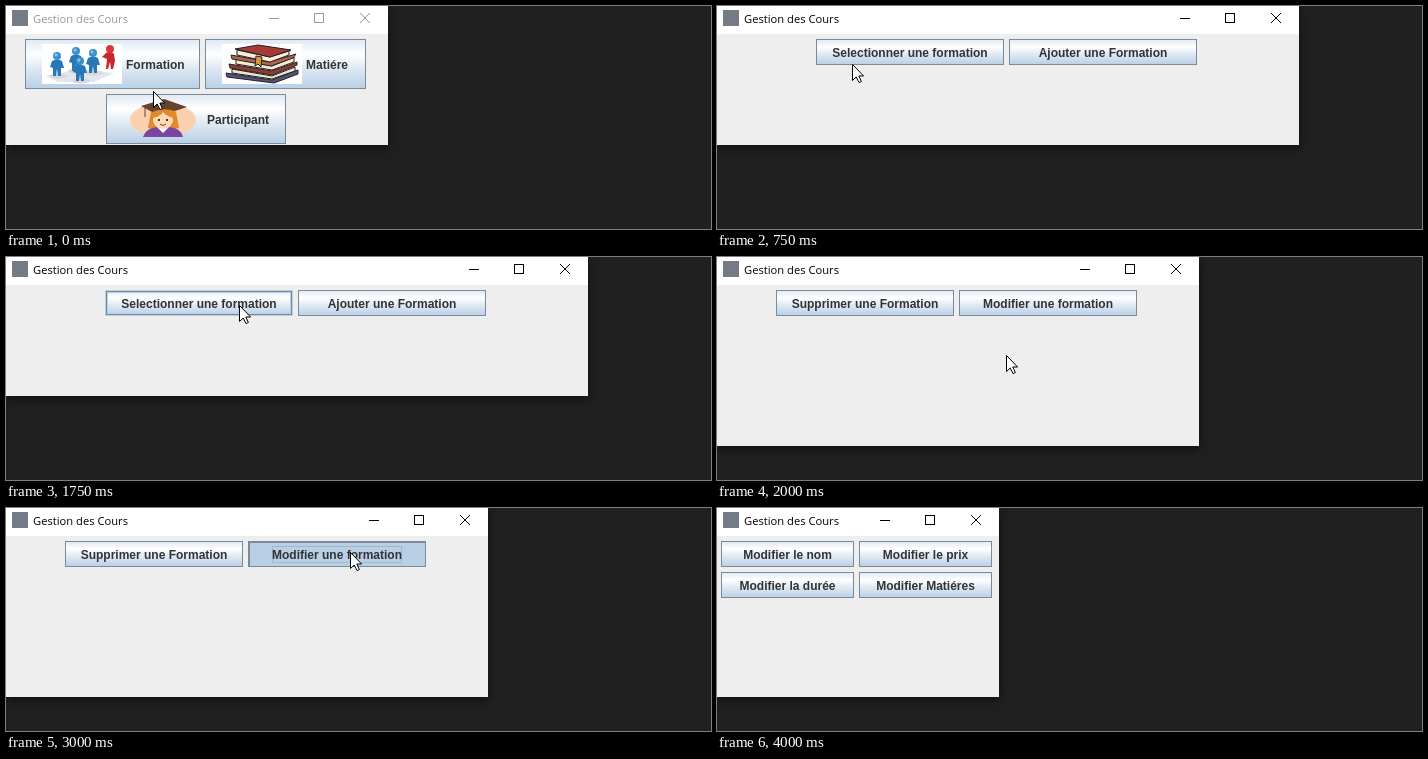
Write an HTML page that moves like this. It is 705x223 px and loops after 4500 ms.

```html
<!DOCTYPE html>
<html lang="fr">
<head>
<meta charset="utf-8">
<title>Gestion des Cours</title>
<style>
html, body { margin: 0; width: 705px; height: 223px; overflow: hidden; background: #202020; }
svg { display: block; }
.label { font: bold 12px "Liberation Sans", Arial, sans-serif; fill: #333; }
.title { font: 11.2px "Open Sans", "Noto Sans", sans-serif; }
.window { filter: drop-shadow(0 3px 5px rgba(0, 0, 0, .55)); }
</style>
</head>
<body>
<svg id="stage" width="705" height="223">
  <defs>
    <linearGradient id="metal" x2="0" y2="1">
      <stop stop-color="#dde8f3"/>
      <stop offset=".3" stop-color="#fff"/>
      <stop offset=".6" stop-color="#dde8f3"/>
      <stop offset="1" stop-color="#b8cfe5"/>
    </linearGradient>
    <g id="blueMan" fill="#2878b8">
      <ellipse cx="1" cy="20" rx="9" ry="2.5" fill="#d5d9de"/>
      <path d="M-5 5Q0 2 5 5L7 12L4 12L4 20H1L0 13L-1 20H-4L-4 12L-7 11Z"/>
      <circle r="4" fill="#3b91cf"/>
      <circle cx="-1" cy="-1" r="1.5" fill="#8cc4ea"/>
    </g>
    <g id="people">
      <path fill="#fff" d="M0 0H80V40H0Z"/>
      <path fill="#e3e6ea" d="M4 32L38 25L72 29L52 38H16Z"/>
      <use href="#blueMan" x="34" y="7"/>
      <use href="#blueMan" x="51" y="9"/>
      <use href="#blueMan" x="15" y="12"/>
      <use href="#blueMan" x="38" y="17"/>
      <path fill="#c8282c" d="M64 9Q69 6 72 10L73 17L71 25H69L68 18L66 25H64L65 15L60 13Z"/>
      <circle cx="68" cy="5" r="4" fill="#d8393b"/>
    </g>
    <g id="books" stroke="#222" stroke-linejoin="round">
      <path fill="#fff" stroke="none" d="M0 0H80V40H0Z"/>
      <path fill="#55517f" d="M4 29L50 36L76 26V30L52 39L5 33Z"/>
      <path fill="#eee5d0" d="M10 25L50 32L73 23V27L50 35L10 29Z"/>
      <path fill="#943b35" d="M7 20L50 27L75 18V21L50 31L8 24Z"/>
      <path fill="#f4ead2" d="M14 15L50 22L72 13V18L50 26L14 20Z"/>
      <path fill="#b0654a" d="M9 11L47 18L74 10L71 14L49 22L10 15Z"/>
      <path fill="#f6ecd8" d="M15 6L48 13L67 7V11L48 18L15 11Z"/>
      <path fill="#a63b36" d="M13 5L36 1L69 6L48 13Z"/>
      <path fill="#d59a35" d="M34 12L40 13L39 23L36 20L33 22Z"/>
    </g>
    <g id="graduate">
      <ellipse cx="40" cy="21" rx="33" ry="17" fill="#fbd0ae"/>
      <path fill="#e08a2b" d="M28 13Q40 2 53 13L56 29Q40 34 25 29Z"/>
      <path fill="#7848a0" d="M20 38Q23 29 34 28H46Q58 29 60 38Z"/>
      <path fill="#fff" d="M34 28L40 34L46 28Z"/>
      <ellipse cx="40" cy="21" rx="10" ry="9" fill="#ffd9b4"/>
      <path fill="#e08a2b" d="M29 19Q30 11 40 11Q51 11 51 19Q43 17 40 13Q37 18 29 19Z"/>
      <path fill="#65432f" d="M18 7L41 0L64 8L52 12Q40 8 29 13Z"/>
      <path fill="none" stroke="#65432f" d="M22 8V18M37 25Q40 28 43 25"/>
      <path fill="#4b3329" d="M35 20h2v2h-2zM43 20h2v2h-2z"/>
    </g>
  </defs>
  <g id="scene"></g>
  <path id="cursor" d="M.5 .5V16.5L4.2 13L7 18.6L9.4 17.5L6.8 12H11.6Z" fill="#fff" stroke="#000"/>
</svg>
<script>
const STEP = 250, STEPS = 18;
const scene = document.getElementById('scene');
const cursor = document.getElementById('cursor');

const screens = [
  { from: 0, w: 382, h: 139, idle: true, buttons: [
    [19, 33, 175, 50, 'Formation', 'people'],
    [199, 33, 161, 50, 'Matiére', 'books'],
    [100, 88, 180, 50, 'Participant', 'graduate']] },
  { from: 3, w: 582, h: 139, buttons: [
    [99, 33, 188, 26, 'Selectionner une formation'],
    [292, 33, 188, 26, 'Ajouter une Formation']] },
  { from: 8, w: 482, h: 189, buttons: [
    [59, 33, 178, 26, 'Supprimer une Formation'],
    [242, 33, 178, 26, 'Modifier une formation']] },
  { from: 13, w: 282, h: 189, buttons: [
    [4, 33, 133, 26, 'Modifier le nom'],
    [142, 33, 133, 26, 'Modifier le prix'],
    [4, 64, 133, 26, 'Modifier la durée'],
    [142, 64, 133, 26, 'Modifier Matiéres']] }
];

// Pointer position per step; it is hidden afterwards.
const pointer = [
  [147, 85], [143, 59], [135, 58], [135, 58], [195, 101], [222, 85],
  [226, 49], [233, 48], [289, 98], [355, 115], [355, 40], [344, 44],
  [344, 44], [342, 73], [275, 108], [190, 35]
];

// Hovered or pressed button per step.
const hover = { 1: 0, 2: 0, 6: 0, 7: 0, 10: 1, 11: 1 };
const press = { 12: 1 };

const rect = (x, y, w, h, fill) =>
  `<rect x="${x}" y="${y}" width="${w}" height="${h}" fill="${fill}"/>`;
const frame = (x, y, w, h, color) =>
  `<rect x="${x + .5}" y="${y + .5}" width="${w - 1}" height="${h - 1}" fill="none" stroke="${color}"/>`;

function button([x, y, w, h, label, icon], hovered, pressed) {
  const edge = '#7a8a99', glow = '#b8cfe5';
  let out = rect(x, y, w, h, pressed ? glow : 'url(#metal)');
  if (hovered) {
    out += frame(x, y, w, h, glow) + frame(x + 1, y + 1, w - 2, h - 2, edge) +
      frame(x + 2, y + 2, w - 4, h - 4, glow);
  } else {
    out += frame(x, y, w, h, edge);
  }
  if (pressed) {
    out += rect(x + 1, y + 1, w - 2, 1, edge) + rect(x + 1, y + 1, 1, h - 2, edge) +
      frame(x + 24, y + 5, w - 48, h - 9, '#a3b8cc');
  }
  if (icon) out += `<use href="#${icon}" x="${x + 17}" y="${y + 5}"/>`;
  const tx = icon ? x + 101 : x + w / 2;
  return out + `<text class="label" x="${tx}" y="${y + h / 2 + 5}" text-anchor="${icon ? 'start' : 'middle'}">${label}</text>`;
}

function windowView({ w, h, idle, buttons }, step) {
  const ink = idle ? '#999' : '#000';
  return `<g class="window">${rect(0, 0, w, h, '#eee')}${rect(0, 0, w, 28, '#fff')}</g>` +
    rect(6, 4, 16, 16, '#747b88') +
    `<text class="title" x="27" y="17" fill="${ink}">Gestion des Cours</text>` +
    rect(w - 119, 12, 10, 1, ink) + frame(w - 74, 7, 10, 10, ink) +
    `<path d="M${w - 28} 7l10 10m0-10l-10 10" stroke="${ink}" fill="none"/>` +
    buttons.map((b, i) => button(b, hover[step] === i, press[step] === i)).join('');
}

let shown = -1;
function draw(now) {
  const step = Math.floor(now / STEP) % STEPS;
  if (step !== shown) {
    shown = step;
    scene.innerHTML = windowView(screens.findLast(s => s.from <= step), step);
    const p = pointer[step];
    cursor.style.display = p ? '' : 'none';
    if (p) cursor.setAttribute('transform', `translate(${p})`);
  }
}

const start = performance.now();
function tick() {
  draw(performance.now() - start);
  requestAnimationFrame(tick);
}
tick();
</script>
</body>
</html>
```
